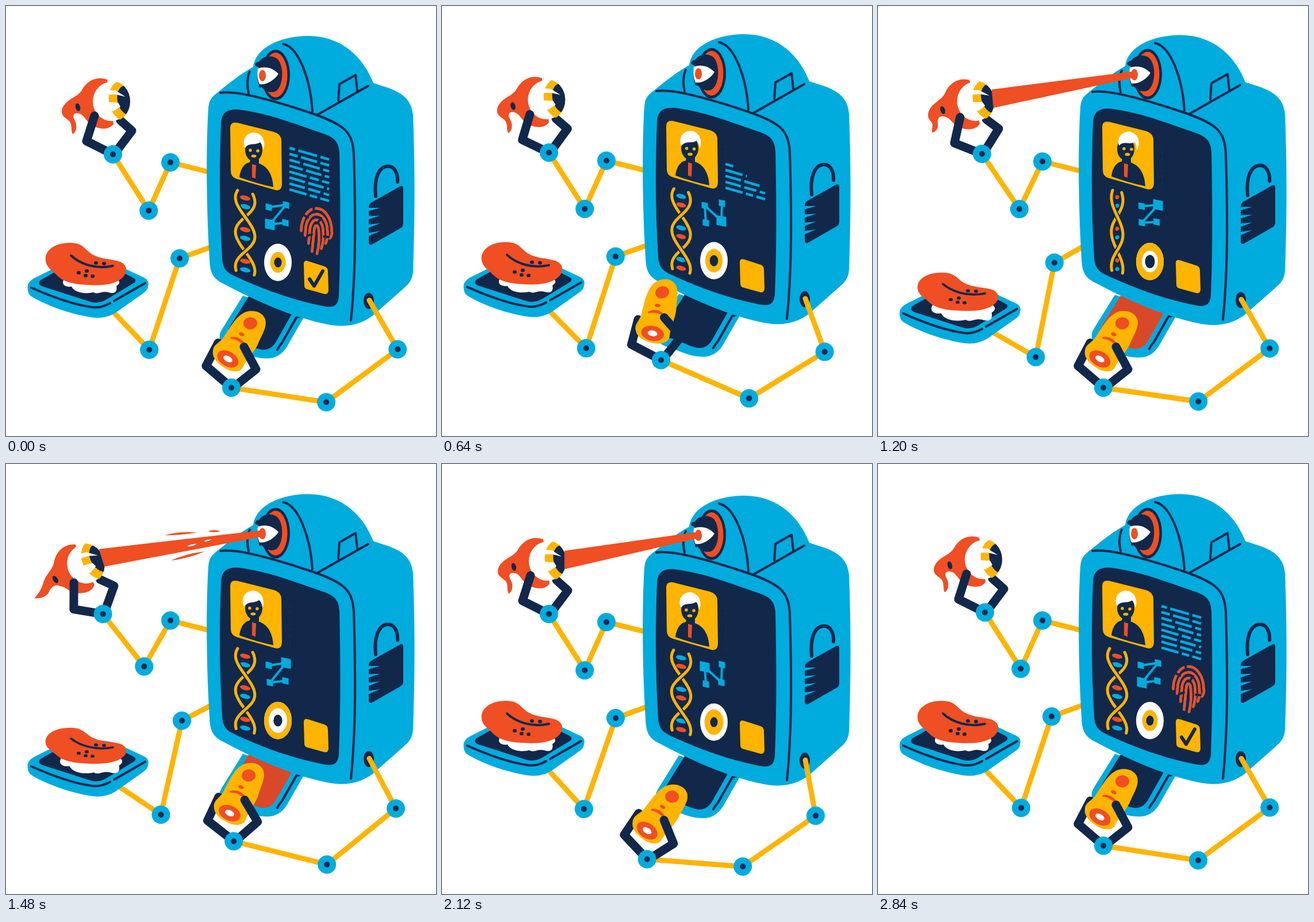
Write an HTML page that moves like this. It is 748 by 748 pixels and loops after 2.88 s.

```html
<!DOCTYPE html>
<html lang="en">
<head>
<meta charset="utf-8">
<title>Identity machine</title>
<style>
  html, body { margin: 0; width: 100%; height: 100%; overflow: hidden; background: #fff; }
  svg { display: block; width: 100vw; height: 100vh; }
  .blue { fill: #00abde; } .navy { fill: #11284b; } .yellow { fill: #ffb400; }
  .red { fill: #f04e23; } .white { fill: #fff; }
  .line, .claw, .arm, .strand, .print, .text { fill: none; stroke-linecap: round; stroke-linejoin: round; }
  .line { stroke: #11284b; stroke-width: 4; }
  .thick { stroke-width: 6; }
  .claw { stroke: #11284b; stroke-width: 15; }
  .arm { stroke: #ffb400; stroke-width: 9; }
  .print { stroke-width: 4.5; }
  .text { stroke: #00abde; stroke-width: 4.5; stroke-linecap: butt; }
</style>
</head>
<body>
<svg viewBox="0 0 748 748">
  <defs>
    <clipPath id="ballClip"><ellipse cx="183" cy="166" rx="33" ry="36"/></clipPath>
  </defs>

  <polyline class="arm" id="eyeArm"/>
  <g id="eyeHand">
    <path class="claw" d="M188 258L219 217L199 199"/>
    <path class="red" id="tail"/>
    <ellipse class="white" cx="183" cy="166" rx="32" ry="34"/>
    <g clip-path="url(#ballClip)">
      <ellipse class="yellow" cx="206" cy="165" rx="27" ry="36" transform="rotate(-12 206 165)"/>
      <ellipse class="navy" cx="211" cy="164" rx="17" ry="26" transform="rotate(-14 211 164)"/>
      <path class="white" d="M174 146L191 147L208 158L192 154L174 154ZM174 167L195 168L199 175L187 183L174 180Z"/>
    </g>
    <ellipse class="navy" cx="125" cy="176" rx="4" ry="7" transform="rotate(-15 125 176)"/>
    <path class="claw" d="M184 257L140 235L154 191"/>
  </g>
  <g id="eyeJoints"></g>

  <polyline class="arm" id="trayArm"/>
  <g id="tray">
    <path class="blue" d="M38 485Q40 479 48 474L80 458C120 440 180 440 205 456L241 473Q250 478 247 487Q247 493 241 498L190 534Q170 546 145 541C110 535 70 521 44 505Q36 500 38 485Z"/>
    <path class="navy" d="M60 477L90 460L196 460L222 473Q229 477 222 482L174 511Q160 519 145 514L64 488Q53 484 60 477Z"/>
    <path class="line" d="M44 490C80 506 120 520 150 524Q165 526 181 517M188 513L242 482"/>
    <path class="white" id="goo" d="M102 474C94 484 104 490 114 488C120 500 140 501 152 498C160 503 166 495 178 498C190 502 194 496 192 487C200 483 198 476 190 474Z"/>
    <g id="liver">
      <path class="red" d="M69 444C66 426 84 412 110 412C135 411 138 426 152 433C164 440 182 440 196 444C212 449 212 463 204 471C192 485 165 487 140 485C115 484 98 479 88 468C80 460 71 455 69 444Z"/>
      <path class="line" d="M113 434C128 448 155 459 186 452"/>
      <path class="line thick" d="M156 447h1M170 448h1M126 464h1M140 461h1M138 469h1M150 470h1"/>
    </g>
  </g>
  <g id="trayJoints"></g>

  <g id="body">
    <path class="blue" d="M412 504L376 562C366 578 374 590 392 596C412 602 430 613 452 613C468 614 480 606 488 594L520 538Z"/>
    <path id="tongue" d="M424 502L388 560C382 572 386 578 398 581C415 585 430 596 446 598C460 598 466 591 472 580L498 534Z"/>
    <path class="line" d="M516 539L505 542L480 586Q474 593 472 598"/>
    <path class="blue" d="M430 106C434 72 478 52 525 52C585 52 622 90 639 134C668 144 705 150 708 190C712 290 711 380 708 462C707 477 700 484 692 491L640 537C618 555 590 560 560 554C500 542 440 516 380 484C358 474 355 462 354 440C348 345 348 240 352 178C353 166 356 160 366 152C386 136 408 118 430 106Z"/>
    <path class="line" d="M373 151C402 146 470 166 530 186C588 206 603 218 605 258C608 360 609 460 600 547M482 66C510 72 530 130 533 183M424 114C419 125 419 140 422 151M542 189L630 139M578 164L580 136L608 120L611 147"/>
    <path class="line thick" d="M643 331C640 300 648 281 662 279C676 277 682 292 681 306"/>
    <path class="navy" d="M637 341L685 314Q691 311 691 318L691 378Q691 383 687 386L638 414Q631 418 631 410L631 350Q631 344 637 341Z"/>
    <path class="blue" id="notches"/>
    <ellipse class="navy" cx="631" cy="513" rx="9" ry="14"/>

    <path class="navy" d="M374 205C375 184 386 179 404 180C455 186 505 206 552 222C572 229 579 237 580 256C582 345 582 430 579 504C578 521 570 526 552 522C500 512 450 494 400 471C382 463 377 456 376 438C371 360 371 280 374 205Z"/>
    <path class="yellow" d="M390 212Q390 201 402 203L466 219Q479 223 479 235L480 308Q480 323 468 320L402 301Q391 298 391 287Z"/>
    <path class="navy" d="M406 298C408 281 416 273 424 272L426 262L440 264L440 274C456 279 464 295 465 315Q436 309 406 298Z"/>
    <path class="red" d="M428 275L435 277L434 300L428 298Z"/>
    <ellipse class="navy" cx="431" cy="250" rx="15" ry="20"/>
    <g class="yellow" id="face">
      <circle cx="425" cy="251" r="2.7"/><circle cx="438" cy="252" r="2.7"/>
      <ellipse cx="431" cy="261" rx="4.5" ry="2.6"/>
    </g>
    <path class="white" id="hair" d="M416 247C410 236 415 222 430 220C445 220 453 234 448 250C446 248 447 241 442 237C433 243 422 237 416 247Z"/>

    <g id="rows"></g>
    <g id="dna"></g>
    <g class="blue" id="net"></g>
    <g id="prints"></g>

    <g id="target"></g>
    <path class="yellow" d="M518 449Q518 441 526 444L554 453Q560 455 560 462L561 494Q561 502 554 501L525 493Q519 492 519 486Z"/>
    <path class="line thick" id="check" pathLength="1" d="M528 475L536 487L551 461"/>

    <ellipse class="navy" cx="469" cy="120" rx="25" ry="44"/>
    <ellipse class="red" cx="469" cy="120" rx="20.5" ry="39"/>
    <path class="navy" d="M434 104C432 100 436 97 440 97C446 87 462 84 472 92C484 104 483 138 470 148C460 153 449 147 445 141Q439 144 440 137C436 128 437 114 440 107Z"/>
    <g id="eye">
      <path class="white" d="M438 109C450 104 464 107 474 118C466 130 452 138 441 136C437 128 437 118 438 109Z"/>
      <ellipse class="red" cx="446" cy="121" rx="6" ry="10"/>
    </g>
  </g>

  <path class="red" id="beam"/>
  <g id="streaks">
    <path class="red" d="M276 124Q300 117 333 119Q305 124 276 124ZM351 117Q362 113 373 117Q362 120 351 117ZM287 168Q312 156 346 152Q318 164 287 168Z"/>
    <path class="white" d="M315 143Q322 139 332 139Q325 144 315 143ZM344 134Q350 131 357 131Q352 136 344 134Z"/>
  </g>

  <polyline class="arm" id="thumbArm"/>
  <g id="thumbHand">
    <path class="claw" d="M390 663L348 627L369 587"/>
    <g id="thumb">
      <path class="yellow" d="M360 600C361 590 370 588 378 578C388 562 399 544 410 537C424 527 446 531 451 546C455 560 444 574 438 590C430 606 418 616 412 630C406 640 390 638 378 629C366 621 358 612 360 600Z"/>
      <g class="red">
        <ellipse cx="425" cy="553" rx="12" ry="10.5"/>
        <ellipse cx="410" cy="572" rx="5" ry="3" transform="rotate(25 410 572)"/>
        <path d="M390 577Q404 574 414 586Q412 590 408 587Q400 580 391 580Z"/>
        <ellipse cx="386" cy="615" rx="20" ry="13" transform="rotate(30 386 615)"/>
      </g>
      <ellipse class="white" cx="386" cy="615" rx="8.5" ry="5" transform="rotate(30 386 615)"/>
    </g>
    <path class="claw" d="M396 664L435 633L414 594"/>
  </g>
  <g id="thumbJoints"></g>
</svg>
<script>
const LOOP = 2880, STEP = 40, TURN = 2 * Math.PI;
const BLUE = '#00abde', NAVY = '#11284b', YELLOW = '#ffb400', RED = '#f04e23';
const $ = id => document.getElementById(id);
const set = (el, attrs) => { for (const k in attrs) el.setAttribute(k, attrs[k]); };
const repeat = (n, make) => Array.from({ length: n }, (_, i) => make(i));
const clamp = v => Math.max(0, Math.min(1, v));
const ramp = (t, from, to) => clamp((t - from) / (to - from));
const smooth = u => u * u * (3 - 2 * u);
const mix = (a, b, k) => a + (b - a) * k;
// Rises to 1 at the peak and falls to 0 at the given distance in ms.
const bump = (t, peak, reach) => Math.cos(Math.PI / 2 * clamp(Math.abs(t - peak) / reach)) ** 2;
const bob = t => -3 * Math.sin(TURN * t / LOOP);

let seed = 7;
const random = () => (seed = seed * 16807 % 2147483647) / 2147483647;

function rotate([x, y], degrees) {
  const a = degrees * Math.PI / 180, c = Math.cos(a), s = Math.sin(a);
  return [x * c - y * s, x * s + y * c];
}

// Two-bone reach from a to b with the elbow hanging below.
function elbow([ax, ay], [bx, by], upper, lower) {
  const d = Math.hypot(bx - ax, by - ay), ux = (bx - ax) / d, uy = (by - ay) / d;
  const along = (d * d + upper * upper - lower * lower) / (2 * d);
  const drop = Math.sqrt(Math.max(0, upper * upper - along * along));
  return [ax + ux * along + uy * drop, ay + uy * along - ux * drop];
}

// Static repeats
const joint = '<g><circle class="blue" r="16"/><circle class="navy" r="5"/></g>';
for (const [name, n] of [['eye', 3], ['tray', 2], ['thumb', 3]]) $(name + 'Joints').innerHTML = joint.repeat(n);

set($('notches'), { d: repeat(4, i => `M630 ${351 + 14.5 * i}L651 ${351 + 13.5 * i}L630 ${357 + 14.5 * i}Z`).join('') });

$('rows').innerHTML = repeat(8, () =>
  `<line class="text" x1="493" stroke-dasharray="${repeat(6, i => i % 2 ? 6 : Math.round(10 + 26 * random()))}"/>`).join('');

const ridges = repeat(4, i => {
  const rx = 4 + 7.5 * i, ry = 9 + 10 * i, left = 36 - 14 * i, right = 40 - 9 * i;
  return `M${540 - rx - left * .1} ${391 + left}L${540 - rx} 391A${rx} ${ry} 0 0 1 ${540 + rx} 391q2 ${right / 2} -3 ${right}`;
});
const ridgePaths = color => ridges.map(d => `<path class="print" pathLength="1" stroke="${color}" d="${d}"/>`).join('');
$('prints').innerHTML = `<g>${ridgePaths(BLUE)}</g><g>${ridgePaths(RED)}</g>
  <path class="line" d="M517 363l8 5M535 349l1 10M548 369l-4 6M524 400l8 -3M553 401l8 1"/>`;
const [printTrail, printInk] = $('prints').children;

$('target').innerHTML = ['white', 'yellow', 'white', 'blue', 'navy']
  .map(c => `<ellipse class="${c}" cx="473" cy="446" rx="24" ry="32.5"/>`).join('');
const [, ring, gap, tint, pupil] = $('target').children;

function reveal(el, part) {
  set(el, { 'stroke-dasharray': `${part} 3`, 'stroke-dashoffset': part - 1, visibility: part > .01 ? 'visible' : 'hidden' });
}

function placeArm(name, start, joints, end = []) {
  set($(name + 'Arm'), { points: [start, ...joints, ...end].join(' ') });
  [...$(name + 'Joints').children].forEach((g, i) => set(g, { transform: `translate(${joints[i]})` }));
}

// Screen
function drawDna(t) {
  const c = Math.cos(4 * Math.PI * t / LOOP);
  const amp = 17 * Math.sign(c) * Math.abs(c) ** .75;
  const strand = side => 'M' + repeat(36, i => {
    const y = 324 + 4 * i, dx = side * amp * Math.sin(Math.PI * (y - 367) / 60);
    return `${(416 + dx).toFixed(1)} ${(y + dx * .25).toFixed(1)}`;
  }).join('L');
  const line = (side, color, width) => `<path class="strand" d="${strand(side)}" stroke="${color}" stroke-width="${width}"/>`;
  const size = Math.max(0, Math.abs(amp) - 6) * .85;
  const rungs = repeat(6, i => {
    const y = 334 + 55 * (i >> 1) + 15 * (i % 2);
    const color = (i % 2 === 0) === amp > 0 ? RED : BLUE;
    return `<ellipse cx="416" cy="${y}" rx="${size}" ry="${Math.min(4, size)}" fill="${color}" transform="rotate(14 416 ${y})"/>`;
  }).join('');
  $('dna').innerHTML = rungs + line(-1, YELLOW, 5) + line(1, NAVY, 9) + line(1, YELLOW, 5);
}

// Four nodes step round the corners of a square, a quarter at a time.
function drawNet(t) {
  const corners = [[457, 350], [459, 380], [486, 377], [487, 346]];
  const quarter = t * 4 / LOOP, whole = Math.floor(quarter);
  const k = smooth(ramp(quarter - whole, .15, .75));
  const nodes = [0, 3, 1, 2].map(i => {
    const from = corners[(i + whole) % 4], to = corners[(i + whole + 1) % 4];
    return [mix(from[0], to[0], k), mix(from[1], to[1], k)];
  });
  const square = ([x, y], i) => {
    const s = i === 2 ? 17 : 11;
    return `<rect x="${-s / 2}" y="${-s / 2}" width="${s}" height="${s}" transform="translate(${x} ${y}) skewY(12)"/>`;
  };
  $('net').innerHTML = `<polyline fill="none" stroke="${BLUE}" stroke-width="4" points="${nodes.join(' ')}"/>` + nodes.map(square).join('');
}

function drawScreen(t) {
  const turn = 6 * bump(t, 1020, 500) - 5 * bump(t, 1720, 400);
  set($('face'), { transform: `translate(${turn * .7} ${-Math.abs(turn) * .3})` });
  set($('hair'), { transform: `translate(${turn} 0) rotate(${turn * 2} 432 240)` });

  const shown = (out, outTime, back, backTime) =>
    t < LOOP / 2 ? 1 - ramp(t, out, out + outTime) : ramp(t, back, back + backTime);
  [...$('rows').children].forEach((row, i) => {
    const part = shown(480 + 30 * i, 87, 2430 + 44 * i, 87), y = 247 + 10.3 * i;
    set(row, { y1: y, x2: 493 + 69 * part, y2: y + 20 * part });
  });
  for (const p of printInk.children) reveal(p, shown(320, 240, 2200, 240));
  for (const p of printTrail.children) reveal(p, shown(380, 240, 2140, 240));
  reveal($('check'), shown(360, 240, 2300, 160));

  const scale = (el, s) => set(el, { rx: 24 * s, ry: 32.5 * s });
  scale(ring, Math.min(1, .56 + .6 * bump(t, 1420, 1000)));
  scale(gap, .68 * bump(t, 1400, 800));
  scale(pupil, .27 + .09 * bump(t, 1100, 800));
  set(tint, { opacity: .5 * clamp(2 - Math.abs(t - 2480) / 80) });
  drawDna(t);
  drawNet(t);
}

// Eyeball arm and scanning beam
const TAIL_CURLED = 'M176 128C160 122 142 128 132 146C124 160 106 160 98 178C94 192 104 194 110 200C116 206 112 216 116 223C124 218 124 206 119 198C114 188 120 184 130 188C140 194 140 206 160 212C172 215 182 213 187 205Z';
const TAIL_STRAIGHT = 'M176 128C160 122 142 128 132 146C126 158 112 162 104 174C100 180 97 184 92 188C90 190 84 194 80 196C90 200 99 200 106 195C116 184 124 184 130 190C140 194 140 206 160 212C172 215 182 213 187 205Z';
function mixPaths(a, b, k) {
  const ends = b.match(/\d+/g);
  let i = 0;
  return a.replace(/\d+/g, n => mix(+n, +ends[i++], k).toFixed(1));
}

function drawEyeball(t, lift) {
  const recoil = bump(t, 860, 200) + 1.6 * bump(t, 1400, 300);
  const sway = bump(t, 2480, 320);
  const turn = -13 * recoil - 4 * (sway + bump(t, 440, 300));
  const hand = [186 - 13 * recoil + 10 * sway, 258 + lift + 2 * recoil - 5 * sway];
  const shoulder = [286, 272 + lift];
  placeArm('eye', [358, 290 + lift], [shoulder, elbow(shoulder, hand, 92, 116), hand]);
  set($('eyeHand'), { transform: `translate(${hand}) rotate(${turn}) translate(-186 -258)` });
  set($('tail'), { d: mixPaths(TAIL_CURLED, TAIL_STRAIGHT, smooth(clamp(recoil + sway))) });

  const reach = ramp(t, 700, 800) * (1 - ramp(t, 2160, 2260));
  const edge = (y, dy) => {
    const [x, down] = rotate([27, dy], turn);
    return [mix(446, hand[0] + x, reach), mix(y + lift, hand[1] + down, reach)];
  };
  set($('beam'), {
    d: `M446 ${115 + lift}L${edge(115, -110)}L${edge(126, -78)}L446 ${126 + lift}Z`,
    visibility: reach > 0 ? 'visible' : 'hidden'
  });
  const flash = Math.min(Math.abs(t - 840), Math.abs(t - 1400)) < 90;
  set($('streaks'), { visibility: flash ? 'visible' : 'hidden' });
}

function drawTray(t, lift) {
  const drop = 46 * bump(t, 1270, 680) - 7 * bump(t, 440, 300);
  const shoulder = [302 + .11 * drop, 439 + .2 * drop + lift], grip = [150, 494 + drop];
  placeArm('tray', [360, 418 + lift], [shoulder, elbow(shoulder, grip, 167.5, 143.7)], [grip]);
  set($('tray'), { transform: `translate(0 ${drop})` });
  set($('liver'), { transform: `translate(0 485) scale(1 ${1 - .15 * bump(t, 1450, 600)}) translate(0 -485)` });
  set($('goo'), { transform: `translate(148 474) scale(${1 + .13 * bump(t, 1270, 700)}) translate(-148 -474)` });
}

// Thumb arm: shoulder angle, hand position, claw turn and extra thumb turn.
const press = [60, 392, 664, 0, 0], lifted = [70, 381, 616, -13, -6];
const swung = [70, 412, 627, -12, -14], lowered = [81, 348, 697, 9, 0];
const moves = [[0, press], [440, lifted], [800, lifted], [1180, press], [1380, press],
  [1720, swung], [2240, lowered], [2480, lowered], [2840, press], [LOOP, press]];

function drawThumb(t, lift) {
  const next = moves.findIndex(([time]) => time > t);
  const [[from, a], [to, b]] = [moves[next - 1], moves[next]];
  const k = smooth(ramp(t, from, to));
  const [angle, x, y, clawTurn, thumbTurn] = a.map((v, i) => mix(v, b[i], k));
  const anchor = [632, 512 + lift], [sx, sy] = rotate([98.5, 0], angle);
  const shoulder = [anchor[0] + sx, anchor[1] + sy], hand = [x, y];
  placeArm('thumb', anchor, [shoulder, elbow(shoulder, hand, 154.5, 167), hand]);
  set($('thumbHand'), { transform: `translate(${hand}) rotate(${clawTurn}) translate(-392 -665)` });
  set($('thumb'), { transform: `rotate(${thumbTurn} 400 595)` });
}

function draw(t) {
  const lift = bob(t);
  const open = 1 - .95 * (bump(t, 480, 150) + bump(t, 2440, 150));
  set($('body'), { transform: `translate(0 ${lift})` });
  set($('eye'), { transform: `translate(0 119) scale(1 ${open}) translate(0 -119)` });
  set($('tongue'), { fill: t > 640 && t < 1500 ? '#da482a' : NAVY });
  drawScreen(t);
  drawEyeball(t, lift);
  drawTray(t, lift);
  drawThumb(t, lift);
}

const began = performance.now();
function frame() {
  const t = (performance.now() - began) % LOOP;
  draw(Math.floor(t / STEP) * STEP);
  requestAnimationFrame(frame);
}
frame();
</script>
</body>
</html>
```
